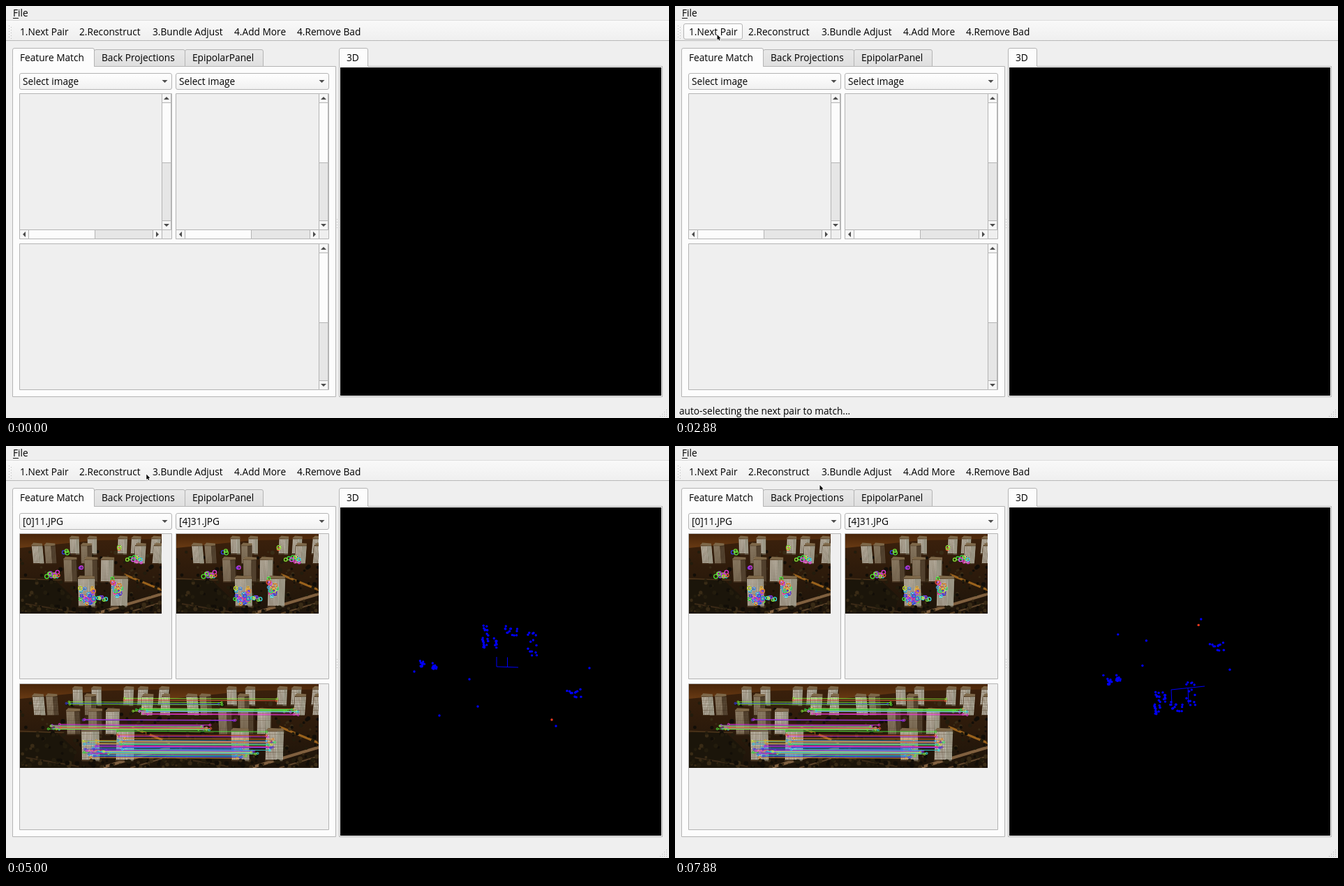
An HTML page with a canvas for the animation above (8 s loop, 950 by 590 pixels).

```html
<!DOCTYPE html>
<html lang="en">
<head>
<meta charset="utf-8">
<title>Reconstruction demo</title>
<style>
html, body { margin: 0; width: 100%; height: 100%; overflow: hidden; background: #efefef; }
canvas { display: block; }
</style>
</head>
<body>
<canvas id="stage" width="950" height="590"></canvas>
<script>
const ctx = document.getElementById('stage').getContext('2d');
const LOOP = 8000, STEP = 125;
const EDGE = '#b4b4b4', BG = '#efefef', BLUE = '#0000fa';

// steps at which the session changes
const LOADED = 28, SOLVED = 37, ORBIT = 46, ORBIT_END = 58;

// pointer moves: first step, last step, place reached
const MOVES = [
  [6, 11, 41, 22], [11, 12, 112, 17], [13, 14, 121, 18], [16, 19, 60.5, 41],
  [30, 32, 142.5, 40], [39, 41, 260, 41], [45, 46, 595.5, 162],
  [46, 54, 675.5, 439], [54, 58, 692, 476], [60, 63, 207.5, 56]
];
const TOOLS = { '1.Next Pair': 20, '2.Reconstruct': 105, '3.Bundle Adjust': 210, '4.Add More': 327, '4.Remove Bad': 417 };

// from step, hovered button, status text
const STATES = [
  [0, -1, ''], [17, 0, ''],
  [18, 0, 'select the next pair of images and match them'],
  [22, 0, ''], [23, 0, 'auto-selecting the next pair to match...'],
  [28, 0, ''], [31, -1, ''],
  [32, 1, 'reconstruct the scene points from the matched pair'],
  [35, 1, ''], [36, 1, 'reconstructing...'], [37, 1, ''], [40, -1, ''],
  [41, 2, 'bundle adjust the camera poses and all of the scene points so far'],
  [46, -1, '']
];

// rows of towers from back to front; y sets their size
const ROWS = [
  { y: 5, lit: [72, 97, 140, 159, 187], dim: [] },
  { y: 15, lit: [19, 164, 190], dim: [37, 88] },
  { y: 35, lit: [116], dim: [64, 93] },
  { y: 62, lit: [84, 130], dim: [] }
];
// matched spots: x, y, width, height, count
const SPOTS = [
  [66, 25, 6, 6, 3], [143, 20, 3, 4, 2], [163, 37, 24, 8, 11], [88, 47, 8, 4, 2],
  [48, 58, 20, 7, 14], [97, 88, 22, 24, 28], [117, 93, 14, 8, 7], [139, 76, 14, 26, 18]
];
// scene points seen from the front: x, y, width, height, count
const CLUSTERS = [
  [687, 273, 9, 32, 23], [701, 282, 6, 15, 7], [724, 265, 18, 14, 13], [753, 284, 15, 38, 14],
  [597, 312, 11, 9, 10], [614, 316, 6, 11, 14], [813, 355, 24, 14, 11],
  [585, 323, 0, 0, 1], [664, 334, 0, 0, 1], [676, 373, 0, 0, 1], [621, 386, 0, 0, 1],
  [788, 401, 0, 0, 1], [836, 318, 0, 0, 1]
];
// three pitches: where the scene plane and the camera frame appear
const VIEWS = [
  { deg: 0, plane: (x, y) => [x, y], cam: [703, 316], arm: [31, 1], leg: [0, -14] },
  { deg: 120, plane: (x, y) => [702 + 0.72 * (x - 686), 394 - 0.45 * (y - 280) - 0.06 * (x - 686)],
    cam: [674, 225], arm: [48, -5], leg: [2, 19] },
  { deg: 157, plane: (x, y) => [690 + 0.72 * (x - 686) - 0.08 * (y - 280), 362 - 0.9 * (y - 280) - 0.05 * (x - 686)],
    cam: [711, 349], arm: [48, -5], leg: [1, 23] }
];

function seeded(s) {
  return () => (s = (s * 16807) % 2147483647) / 2147483647;
}
const spread = (r, size) => (r() - 0.5) * size;
const clamp = v => Math.min(1, Math.max(0, v));

function fill(x, y, w, h, c) {
  ctx.fillStyle = c;
  ctx.fillRect(x, y, w, h);
}
function box(x, y, w, h, c, r = 0) {
  ctx.beginPath();
  ctx.roundRect(x + 0.5, y + 0.5, w - 1, h - 1, r);
  ctx.fillStyle = c;
  ctx.fill();
  ctx.strokeStyle = EDGE;
  ctx.lineWidth = 1;
  ctx.stroke();
}
function shade(y, h, top, bottom) {
  const g = ctx.createLinearGradient(0, y, 0, y + h);
  g.addColorStop(0, top);
  g.addColorStop(1, bottom);
  return g;
}
function shape(pts, c, edge, width = 1) {
  ctx.beginPath();
  pts.forEach(p => ctx.lineTo(p[0], p[1]));
  ctx.closePath();
  if (edge) {
    ctx.strokeStyle = edge;
    ctx.lineWidth = width;
    ctx.stroke();
  }
  ctx.fillStyle = c;
  ctx.fill();
}
function line(x1, y1, x2, y2, c, w = 1) {
  ctx.beginPath();
  ctx.moveTo(x1, y1);
  ctx.lineTo(x2, y2);
  ctx.strokeStyle = c;
  ctx.lineWidth = w;
  ctx.stroke();
}
function dot(x, y, r, c) {
  ctx.beginPath();
  ctx.arc(x, y, r, 0, 7);
  ctx.fillStyle = c;
  ctx.fill();
}
function ring(x, y, r, c, w = 1) {
  ctx.beginPath();
  ctx.arc(x, y, r, 0, 7);
  ctx.strokeStyle = c;
  ctx.lineWidth = w;
  ctx.stroke();
}
function text(s, x, y) {
  ctx.fillStyle = '#000';
  ctx.fillText(s, x, y);
}

// small triangle pointing along (dx, dy)
function arrow(x, y, dx, dy, s = 4) {
  shape([[x + dx * s / 2, y + dy * s / 2], [x - dx * s / 2 - dy * s, y - dy * s / 2 + dx * s],
    [x - dx * s / 2 + dy * s, y - dy * s / 2 - dx * s]], '#4c4c4c');
}
function vbar(x, y, h, handle) {
  box(x, y, 14, h, '#e6e6e6');
  box(x, y, 14, 14, '#f6f6f6');
  box(x, y + h - 14, 14, 14, '#f6f6f6');
  box(x, y + 13, 14, handle, '#fcfcfc');
  arrow(x + 7, y + 7, 0, -1);
  arrow(x + 7, y + h - 7, 0, 1);
}
function hbar(x, y, w, handle) {
  box(x, y, w, 14, '#e6e6e6');
  box(x, y, 14, 14, '#f6f6f6');
  box(x + w - 14, y, 14, 14, '#f6f6f6');
  box(x + 13, y, handle, 14, '#fcfcfc');
  arrow(x + 7, y + 7, -1, 0);
  arrow(x + w - 7, y + 7, 1, 0);
}
function combo(x, w, label) {
  box(x, 96, w, 24, shade(96, 24, '#ffffff', '#f0f0f0'), 2.5);
  text(label, x + 5, 113);
  arrow(x + w - 10.5, 108, 0, 1);
}
function tab(x, w, label, active) {
  const y = active ? 60 : 62, h = active ? 27 : 25;
  box(x, y, w + 1, h, active ? '#fcfcfc' : shade(y, h, '#e9e9e9', '#dfdfdf'), [2.5, 2.5, 0, 0]);
  if (active) fill(x + 1, 86, w - 1, 2, '#fcfcfc');
  text(label, x + 11, 79);
}

// sideways shift between the two pictures: far things move more
const parallax = y => 6.6 - y / 10;

function tower(x, y, lit) {
  const w = 13 + y * 0.18, h = 23 + y * 0.32, front = w * 0.6;
  const lean = (102 - x) * 0.0011;
  ctx.save();
  ctx.transform(1, 0, lean, 1, -lean * (y + h), 0);
  fill(x, y, front, h, shade(y, h, '#6e5b44', '#4d3a26'));
  fill(x + front, y + 1, w - front, h - 1, lit ? '#6d6350' : '#3a2a1a');
  shape([[x, y + 1], [x + 3, y - 2.5], [x + w, y - 1.5], [x + w, y + 1.5], [x + front, y + 2]], '#7d6748');
  for (let j = y + 3; j < y + h - 2; j += 2) {
    for (let i = x + 0.8; i < x + w - 1; i += 2.2) {
      const side = i > x + front;
      fill(i, j, 1.6, 1.25, lit ? (side ? '#cfcfc0' : '#f7f9f0') : (side ? '#6d5b45' : '#a3967f'));
    }
  }
  ctx.restore();
}

// the architectural model at night, on a 204 x 114 grid
function scene(x, y, w, h, moved) {
  const r = seeded(77);
  const trees = (count, top, range) => {
    for (let i = 0; i < count; i++) {
      dot(r() * 204, top + r() * range, 1.2 + r() * 2, ['#120e08', '#231c0d', '#392b16'][i % 3]);
    }
  };
  ctx.save();
  ctx.beginPath();
  ctx.rect(x, y, w, h);
  ctx.clip();
  ctx.translate(x, y);
  ctx.scale(w / 204, h / 114);
  fill(0, 0, 204, 114, shade(0, 114, '#3c210c', '#1d140a'));
  shape([[0, 0], [204, 0], [204, 7], [110, 9], [0, 20]], shade(0, 20, '#472409', '#683a13'));
  shape([[0, 66], [46, 62], [76, 90], [70, 114], [0, 114]], '#1b150a');
  line(0, 64, 60, 66, '#4d351b', 1.5);
  line(8, 100, 80, 112, '#3b2a17', 2);
  line(150, 58, 204, 80, '#9a621c', 3);
  line(110, 114, 204, 86, '#80603f', 4);
  line(150, 114, 204, 98, '#5e452b', 2);
  trees(200, 25, 89);
  for (const row of ROWS) {
    const at = parallax(row.y) * moved;
    for (const tx of row.dim) tower(tx + at, row.y, false);
    for (const tx of row.lit) tower(tx + at, row.y, true);
  }
  trees(50, 103, 10);
  ctx.restore();
}

// keypoints on both pictures, and the lines that join them below
function matches() {
  const r = seeded(431);
  for (const [cx, cy, w, h, count] of SPOTS) {
    for (let i = 0; i < count; i++) {
      const x = cx + spread(r, w), y = cy + spread(r, h), x2 = x + parallax(y);
      const c = `hsl(${Math.floor(r() * 360)} 75% 55%)`, size = 1.6 + r() * 1.4;
      ring(20 + x, 126 + y, size, c, 1.3);
      ring(244 + x2, 126 + y, size, c, 1.3);
      const a = [20 + x * 1.054, 341 + y * 1.053], b = [235 + x2 * 1.044, 342 + y * 1.053];
      line(...a, ...b, c, 0.9);
      ring(...a, 1.4, c);
      ring(...b, 1.4, c);
    }
  }
}

// trigonometric interpolation through the three pitches
function weights(deg) {
  const s = (a, b) => Math.sin((a - b) * Math.PI / 360);
  return VIEWS.map(v => VIEWS.reduce((p, u) => u === v ? p : p * s(deg, u.deg) / s(v.deg, u.deg), 1));
}
function cloud(deg) {
  const k = weights(deg), r = seeded(58);
  const blend = get => [0, 1].map(i => VIEWS.reduce((sum, v, j) => sum + k[j] * get(v)[i], 0));
  for (const [cx, cy, w, h, count] of CLUSTERS) {
    const [x, y] = blend(v => v.plane(cx, cy));
    for (let i = 0; i < count; i++) dot(x + spread(r, w), y + spread(r, h), 1.7, BLUE);
  }
  dot(...blend(v => v.plane(782, 392)), 1.7, '#f03a20');
  const [x, y] = blend(v => v.cam), [ax, ay] = blend(v => v.arm), [lx, ly] = blend(v => v.leg);
  line(x, y, x + ax, y + ay, BLUE);
  for (const half of [0, 0.5]) {
    const px = x + ax * half, py = y + ay * half;
    line(px, py, px + lx, py + ly, BLUE);
  }
}

function hand(x, y) {
  ctx.save();
  ctx.translate(x, y);
  ctx.beginPath();
  ctx.moveTo(2.5, 2.5);
  ctx.quadraticCurveTo(4, -0.5, 5.5, 2);
  ctx.lineTo(6.5, 8);
  ctx.quadraticCurveTo(8, 7, 9, 9);
  ctx.quadraticCurveTo(10.5, 8, 11.3, 10);
  ctx.quadraticCurveTo(13.4, 9.4, 13.5, 12);
  ctx.lineTo(13, 17);
  ctx.lineTo(11.5, 22);
  ctx.lineTo(5, 22);
  ctx.lineTo(1, 15.5);
  ctx.quadraticCurveTo(-0.5, 12, 3.5, 13.5);
  ctx.closePath();
  ctx.fillStyle = '#fff';
  ctx.fill();
  ctx.strokeStyle = '#111';
  ctx.lineWidth = 1.2;
  ctx.stroke();
  for (const i of [6.6, 9, 11.2]) line(i, 9, i + 0.2, 12.5, '#111', 0.9);
  ctx.restore();
}
function pointer(n) {
  if (n < MOVES[0][0]) return;
  let x = 164, y = 298;
  for (const [from, to, tx, ty] of MOVES) {
    const k = clamp((n - from) / (to - from));
    x += (tx - x) * k;
    y += (ty - y) * k;
  }
  if (n < 17) return hand(x, y);
  const pts = [[0, 0], [0, 7.4], [1.7, 6], [2.8, 8.6], [4, 8], [3, 5.6], [5, 5.2]];
  shape(pts.map(p => [x + p[0], y + p[1]]), '#080808', '#fff', 1.6);
}

// dotted handle, alternating between two columns
function grip(x, top, bottom) {
  for (let y = top; y < bottom; y += 4) {
    fill(x, y, 1, 1, '#bdbdbd');
    fill(x + 3, y + 2, 1, 1, '#bdbdbd');
  }
}

function toolbar(hover, pressed) {
  text('File', 10, 15);
  fill(10, 17, 8, 1, '#111');
  fill(0, 20, 950, 30, shade(20, 30, '#f9f9f9', '#efefef'));
  fill(0, 20, 950, 1, '#dcdcdc');
  fill(0, 49, 950, 1, '#b9b9b9');
  grip(4, 28, 46);
  Object.entries(TOOLS).forEach(([label, x], i) => {
    if (i === hover) {
      const w = Math.round(ctx.measureText(label).width) + 14;
      box(x - 8, 25, w + 1, 23, pressed ? '#e2e2e2' : shade(25, 23, '#ffffff', '#f6f6f6'), 2.5);
    }
    text(label, x, 42);
  });
}

function panels(loaded, solved) {
  box(9, 86, 464, 474, '#fcfcfc');
  tab(126, 130, 'Back Projections');
  tab(256, 112, 'EpipolarPanel');
  tab(9, 117, 'Feature Match', true);
  combo(19, 219, loaded ? '[0]11.JPG' : 'Select image');
  combo(243, 220, loaded ? '[4]31.JPG' : 'Select image');
  box(19, 125, 219, 209, BG);
  box(243, 125, 220, 209, BG);
  box(19, 340, 444, 210, BG);
  if (!loaded) {
    for (const [x, w] of [[19, 205], [243, 206]]) {
      vbar(x + w - 1, 125, 196, 87);
      hbar(x, 320, w, 96);
    }
    vbar(448, 340, 210, 101);
    return;
  }
  scene(20, 126, 203, 114, 0);
  scene(244, 126, 204, 114, 1);
  scene(20, 341, 215, 120, 0);
  scene(235, 341, 213, 120, 1);
  if (solved) matches();
}

function view3d(n) {
  box(477, 86, 464, 474, '#fcfcfc');
  tab(477, 41, '3D', true);
  fill(479, 88, 460, 470, '#000');
  if (n >= SOLVED) {
    const k = clamp((n - ORBIT) / (ORBIT_END - ORBIT));
    cloud(157 * (1 - (1 - k) ** 1.31));
  }
  grip(474, 305, 320);
  for (let i = 0; i < 4; i++) {
    for (let j = 0; j <= i; j++) fill(946 - j * 3, 578 + i * 3, 1, 1, '#b8b8b8');
  }
}

function draw(n) {
  const [, hover, status] = STATES.filter(s => s[0] <= n).pop();
  ctx.font = '500 13.7px "Open Sans", "Noto Sans", sans-serif';
  fill(0, 0, 950, 590, BG);
  toolbar(hover, n === 22 || n === 35);
  panels(n >= LOADED, n >= SOLVED);
  view3d(n);
  text(status, 6, 585);
  pointer(n);
}

let shown = -1;
function tick(now) {
  const n = Math.floor((now % LOOP) / STEP);
  if (n !== shown) draw(shown = n);
  requestAnimationFrame(tick);
}
draw(0);
requestAnimationFrame(tick);
</script>
</body>
</html>
```
